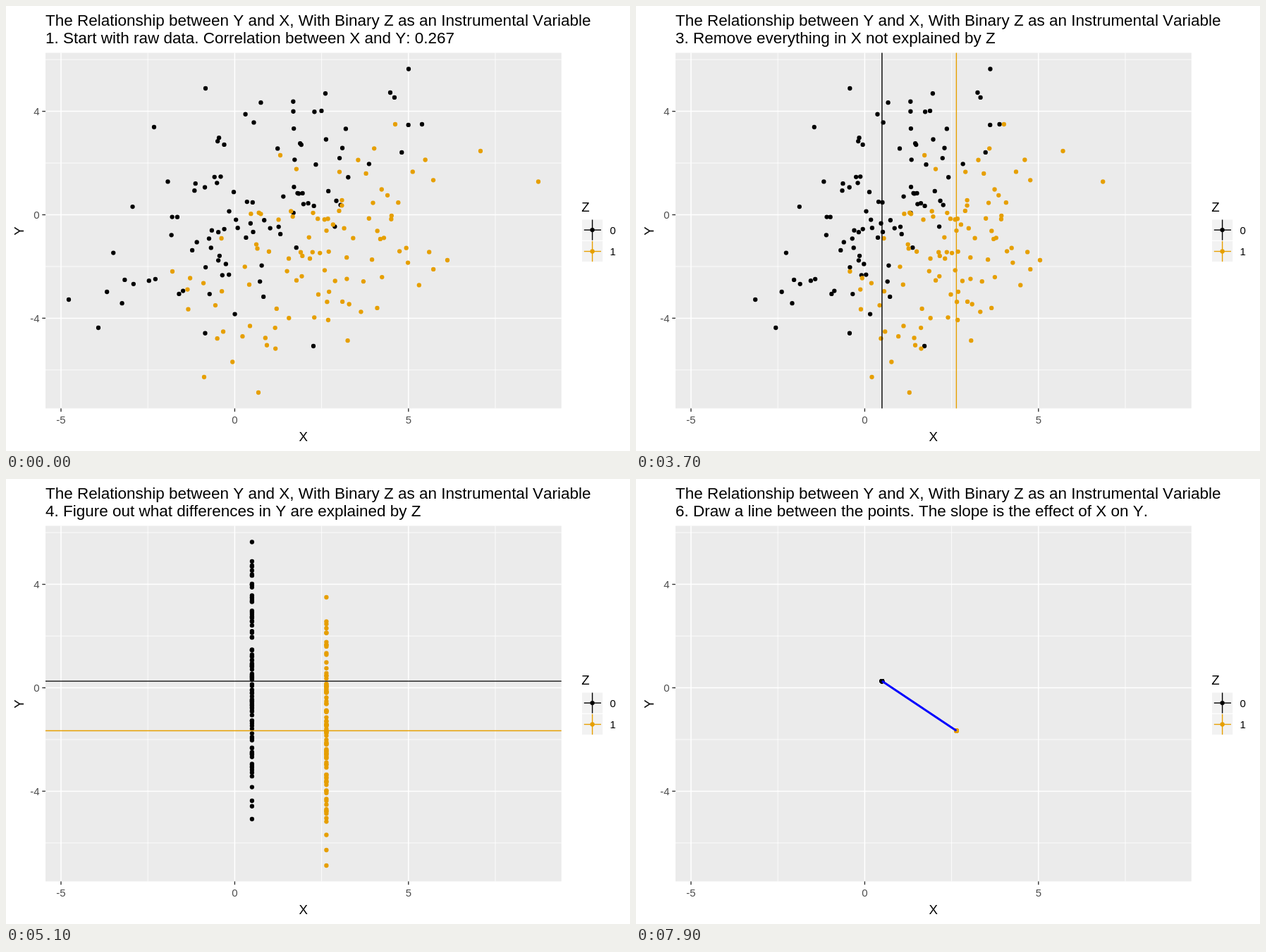
Recreate the animation shown at these times as an HTML page. Size 885x632 px, loop 10 s.

```html
<!DOCTYPE html>
<html lang="en">
<head>
<meta charset="utf-8">
<title>Instrumental variable</title>
<style>
  html, body { margin: 0; width: 100%; height: 100%; overflow: hidden; background: #fff; }
  svg { display: block; width: 885px; height: 632px; }
  text { font-family: "Liberation Sans", Arial, sans-serif; font-kerning: none; white-space: pre; }
</style>
</head>
<body>
<svg id="stage" viewBox="0 0 885 632" xmlns="http://www.w3.org/2000/svg"></svg>
<script>
const LOOP = 10000;
const GROUP_SIZE = 100;
const stage = document.getElementById("stage");
const panel = { left: 56, top: 66.5, right: 787.7, bottom: 571.5 };
const px = x => 324.4 + 49.28 * x;
const py = y => 296.5 - 36.73 * y;

// Each group is a tilted normal cloud plus the few outliers that set its outline.
const groups = [
  {
    color: "#000", mean: [348.9, 287.1], spread: [109, 95], seed: 7,
    outliers: [[571, 89.5], [545, 123], [590, 168], [283, 117], [210, 172], [89, 417], [131, 457], [436, 483]]
  },
  {
    color: "#E69F00", mean: [454.4, 357.5], spread: [104, 91], seed: 21,
    outliers: [[755, 249.5], [673, 206], [552, 168], [389, 212], [626, 361], [236, 377], [281, 527], [358, 549]]
  }
];

const captions = [
  [0, "1. Start with raw data. Correlation between X and Y: 0.267"],
  [2100, "2. Figure out what differences in X are explained by Z"],
  [3500, "3. Remove everything in X not explained by Z"],
  [4900, "4. Figure out what differences in Y are explained by Z"],
  [6300, "5. Remove everything in Y not explained by Z"],
  [7700, "6. Draw a line between the points. The slope is the effect of X on Y."]
];

function add(tag, attrs, parent = stage) {
  const node = document.createElementNS("http://www.w3.org/2000/svg", tag);
  for (const key in attrs) node.setAttribute(key, attrs[key]);
  return parent.appendChild(node);
}

function line(x1, y1, x2, y2, stroke, width, parent) {
  return add("line", { x1, y1, x2, y2, stroke, "stroke-width": width }, parent);
}

function rect(x, y, width, height, fill) {
  return add("rect", { x, y, width, height, fill });
}

function dot(cx, cy, fill) {
  return add("circle", { cx, cy, r: 3.15, fill });
}

function label(x, y, content, size, options = {}) {
  const node = add("text", { x, y, "font-size": size, fill: "#000", ...options });
  node.textContent = content;
  return node;
}

function seededRandom(seed) {
  return () => {
    seed = (seed + 0x6D2B79F5) | 0;
    let t = Math.imul(seed ^ (seed >>> 15), 1 | seed);
    t = (t + Math.imul(t ^ (t >>> 7), 61 | t)) ^ t;
    return ((t ^ (t >>> 14)) >>> 0) / 4294967296;
  };
}

// Correlated normal points; even steps in probability keep the cloud bounded.
function cloud({ mean, spread, seed, outliers }) {
  const random = seededRandom(seed);
  const count = GROUP_SIZE - outliers.length;
  const tilt = Math.asin(0.55);
  return Array.from({ length: count }, (_, i) => {
    const radius = Math.sqrt(-2 * Math.log(0.12 + 0.88 * (i + 0.5) / count));
    const angle = 2 * Math.PI * random();
    return [
      mean[0] + spread[0] * radius * Math.cos(angle),
      mean[1] - spread[1] * radius * Math.sin(angle + tilt)
    ];
  });
}

function drawAxes() {
  const { left, top, right, bottom } = panel;
  rect(left, top, right - left, bottom - top, "#EBEBEB");
  for (const x of [-2.5, 2.5, 7.5]) line(px(x), top, px(x), bottom, "#fff", 0.8);
  for (const y of [-6, -2, 2, 6]) line(left, py(y), right, py(y), "#fff", 0.8);
  for (const x of [-5, 0, 5]) {
    line(px(x), top, px(x), bottom, "#fff", 1.5);
    line(px(x), bottom, px(x), bottom + 4.7, "#333", 1.4);
    label(px(x), 592.6, x, 15, { fill: "#4D4D4D", "text-anchor": "middle" });
  }
  for (const y of [-4, 0, 4]) {
    line(left, py(y), right, py(y), "#fff", 1.5);
    line(left - 4.7, py(y), left, py(y), "#333", 1.4);
    label(47.6, py(y) + 5.6, y, 15, { fill: "#4D4D4D", "text-anchor": "end" });
  }
  label(421.8, 617.5, "X", 18.7, { "text-anchor": "middle" });
  label(0, 0, "Y", 18.7, { "text-anchor": "middle", transform: "translate(24.6 319.5) rotate(-90)" });
}

function drawLegend() {
  label(816.2, 292.2, "Z", 18.7);
  groups.forEach(({ color }, i) => {
    const y = 318.1 + 30.4 * i;
    rect(817, y - 14.6, 29.2, 29.2, "#F2F2F2");
    line(831.6, y - 14.6, 831.6, y + 14.6, color, 1.4);
    line(819.8, y, 844, y, color, 1.4);
    dot(831.6, y, color);
    label(856.6, y + 5.8, i, 15);
  });
}

label(56, 27.6, "The Relationship between Y and X, With Binary Z as an Instrumental Variable", 22.49);
const caption = label(56, 53, "", 22.49);
drawAxes();
drawLegend();

const dots = groups.flatMap(group =>
  [...group.outliers, ...cloud(group)].map(([x, y]) =>
    ({ x, y, mean: group.mean, node: dot(x, y, group.color) })));
const xMeans = add("g");
const yMeans = add("g");
for (const { color, mean: [x, y] } of groups) {
  line(x, panel.top, x, panel.bottom, color, 1.4, xMeans);
  line(panel.left, y, panel.right, y, color, 1.4, yMeans);
}
const slope = line(...groups[0].mean, ...groups[1].mean, "#00F", 3);

// Sine ease in eight held steps of 100 ms.
function collapse(ms, start) {
  const step = Math.min(8, Math.max(0, Math.floor((ms - start) / 100) + 1));
  return (1 - Math.cos(Math.PI * step / 8)) / 2;
}

function show(node, visible) {
  node.setAttribute("visibility", visible ? "visible" : "hidden");
}

function render(ms) {
  const text = captions.filter(([start]) => ms >= start).pop()[1];
  if (caption.textContent !== text) caption.textContent = text;
  show(xMeans, ms >= 2300 && ms < 4900);
  show(yMeans, ms >= 5100 && ms < 7700);
  show(slope, ms >= 7900);
  const shiftX = collapse(ms, 3500);
  const shiftY = collapse(ms, 6300);
  for (const { x, y, mean, node } of dots) {
    node.setAttribute("cx", x + (mean[0] - x) * shiftX);
    node.setAttribute("cy", y + (mean[1] - y) * shiftY);
  }
}

const begin = performance.now();
function tick() {
  render((performance.now() - begin) % LOOP);
  requestAnimationFrame(tick);
}
tick();
</script>
</body>
</html>
```
